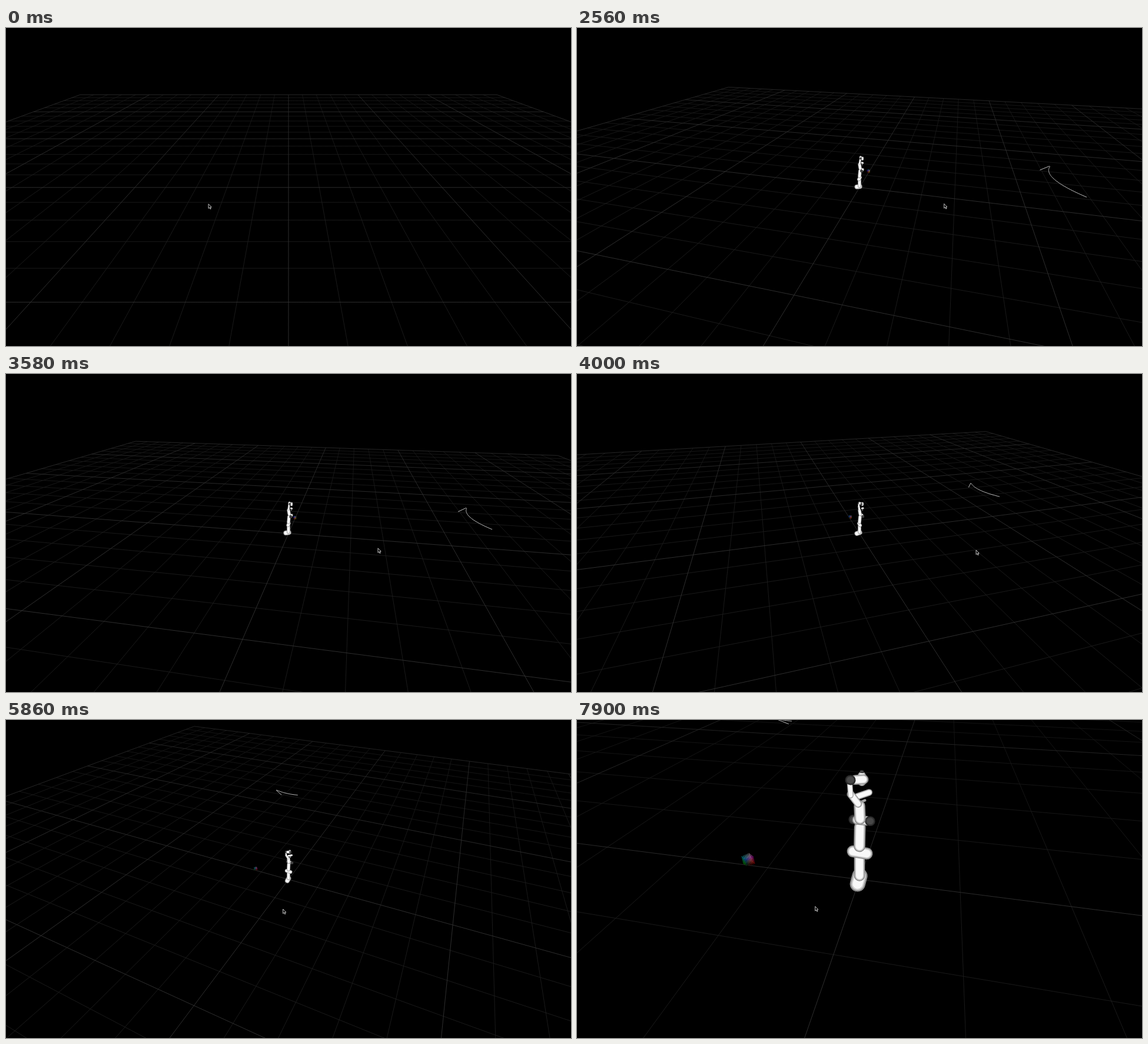
Recreate the animation shown at these times as an HTML page with a canvas. Size 960 by 540 pixels, loop 8 s.

```html
<!DOCTYPE html>
<html lang="en">
<head>
<meta charset="utf-8">
<title>Robot arm viewer</title>
<style>
html, body { margin: 0; width: 100%; height: 100%; overflow: hidden; background: #000; }
canvas { display: block; width: 960px; height: 540px; }
</style>
</head>
<body>
<canvas id="view" width="960" height="540"></canvas>
<script>
const ctx = document.getElementById('view').getContext('2d');
const LOOP = 8000, CX = 480, CY = 270.8, FOCAL = 579;
const CELL = 0.0902, HALF = 15, RAD = Math.PI / 180;
const NEAR_DIST = 0.3133;
const UNIT = NEAR_DIST / FOCAL; // one pixel at the origin in the closest view

// Monotone cubic through [time, value] pairs.
function track(...keys) {
  const last = keys.length - 1;
  const slope = i => (keys[i + 1][1] - keys[i][1]) / (keys[i + 1][0] - keys[i][0]);
  const tangent = keys.map((k, i) => {
    if (i === 0 || i === last) return 0;
    const p = slope(i - 1), q = slope(i);
    return p * q <= 0 ? 0 : 2 * p * q / (p + q);
  });
  return t => {
    if (t <= keys[0][0]) return keys[0][1];
    if (t >= keys[last][0]) return keys[last][1];
    let i = 0;
    while (t >= keys[i + 1][0]) i++;
    const [t0, v0] = keys[i], [t1, v1] = keys[i + 1];
    const h = t1 - t0, u = (t - t0) / h, w = 1 - u;
    return v0 * (1 + 2 * u) * w * w + tangent[i] * h * u * w * w
      + v1 * u * u * (3 - 2 * u) - tangent[i + 1] * h * u * u * w;
  };
}

// Smooth 0 to 1 between two times.
function ramp(t, from, to) {
  const u = Math.min(1, Math.max(0, (t - from) / (to - from)));
  return u * u * (3 - 2 * u);
}

const yawAt = track([2140, 0], [2560, 15], [2980, 28.5], [3180, 27.6], [4000, -16],
  [4660, -43.1], [5400, -73.3], [5660, -73.3], [5860, -65.5], [6020, -78.1]);
const pitchAt = track([2140, 26.4], [2560, 26.2], [3180, 24], [4000, 26.5], [4660, 37.9], [5400, 37.4]);

let cam;
function setCamera(t) {
  const yaw = yawAt(t) * RAD, pitch = pitchAt(t) * RAD;
  cam = { sy: Math.sin(yaw), cy: Math.cos(yaw), sp: Math.sin(pitch), cp: Math.cos(pitch),
    dist: NEAR_DIST ** ramp(t, 6960, 7420) };
}

function toCamera(a, b, h = 0) {
  const forward = a * cam.cy - b * cam.sy;
  return [a * cam.sy + b * cam.cy,
    forward * cam.sp + h * cam.cp,
    cam.dist + forward * cam.cp - h * cam.sp];
}

const toScreen = ([x, y, d]) => [CX + FOCAL * x / d, CY - FOCAL * y / d];
const project = (a, b, h) => toScreen(toCamera(a, b, h));

function groundLine(a0, b0, a1, b1) {
  let p = toCamera(a0, b0), q = toCamera(a1, b1);
  const near = 0.03;
  if (p[2] < near && q[2] < near) return;
  const clip = (from, to) => {
    const u = (near - from[2]) / (to[2] - from[2]);
    return from.map((v, i) => v + (to[i] - v) * u);
  };
  if (p[2] < near) p = clip(p, q);
  else if (q[2] < near) q = clip(q, p);
  ctx.moveTo(...toScreen(p));
  ctx.lineTo(...toScreen(q));
}

function drawGrid() {
  const edge = HALF * CELL;
  ctx.lineWidth = 0.9;
  for (const bold of [false, true]) {
    const fade = ctx.createLinearGradient(0, 0, 0, 540);
    fade.addColorStop(0, bold ? '#242424' : '#141414');
    fade.addColorStop(.6, bold ? '#323232' : '#1c1c1c');
    ctx.strokeStyle = fade;
    ctx.beginPath();
    for (let i = -HALF; i <= HALF; i++) {
      if ((i % 5 === 0) !== bold) continue;
      groundLine(i * CELL, -edge, i * CELL, edge);
      groundLine(-edge, i * CELL, edge, i * CELL);
    }
    ctx.stroke();
  }
}

// A parabola on the ground with a short hook; its tail recedes at a steady rate.
function drawTrail(t) {
  const tip = 0.322;
  ctx.strokeStyle = '#bcbcbc';
  ctx.lineWidth = 1;
  ctx.beginPath();
  for (let a = 0.02 + 0.000033 * t; a < tip; a += 0.005) {
    ctx.lineTo(...project(a, 0.561 + 3 * (a - 0.25) ** 2));
  }
  ctx.lineTo(...project(tip, 0.574));
  ctx.lineTo(...project(0.278, 0.537));
  ctx.stroke();
}

// Lattice of points coloured by position.
function drawCube() {
  const n = 6, side = 0.0076, dots = [];
  for (let i = 0; i < n ** 3; i++) {
    const rgb = [i, i / n, i / n / n].map(v => Math.floor(v) % n / (n - 1));
    const [x, y, z] = rgb.map(v => (v - .5) * side);
    dots.push({ p: toCamera(.1092 - .54 * x + .83 * y, .83 * x + .54 * y, .0063 + z),
      color: `rgb(${rgb.map(v => Math.round(v * 175)).join()})` });
  }
  dots.sort((m, k) => k.p[2] - m.p[2]);
  const size = 0.36 / cam.dist;
  for (const { p, color } of dots) {
    const [x, y] = toScreen(p);
    ctx.fillStyle = color;
    ctx.fillRect(x - size / 2, y - size / 2, size, size);
  }
}

const WHITE = ['#8e8e8e', '#cdcdcd', '#f8f8f8'], DARK = ['#262626', '#363636', '#484848'];
const GREY = ['#666', '#8c8c8c', '#aaa'];

// Rounded limb between two points given as [side, front, height].
const limb = (from, to, radius, tones = WHITE) => ({ from, to, radius, tones });
const ROBOT = [
  limb([0, -15, 2], [0, 2, 6], 13),
  limb([0, 0, 8], [0, 0, 46], 9),
  limb([-11, 0, 55], [12, 0, 54], 9.5),
  limb([0, 0, 66], [0, 3, 99], 9),
  limb([-13, 15, 104], [-12, 15, 104], 7.5, DARK),
  limb([13, 15, 104], [14, 15, 104], 7.5, DARK),
  limb([-7, 15, 104], [8, 15, 104], 7.5),
  limb([0, 4, 112], [0, 0, 135], 8.5),
  limb([-2, 0, 138], [-13, 0, 152], 5.5),
  limb([-13, 0, 150], [-14, 0, 168], 4),
  limb([-14, 2, 172], [-13, 2, 172], 7, DARK),
  limb([-7, 4, 172], [4, 8, 172], 7),
  limb([6, 8, 172], [7, 8, 172], 5, DARK),
  limb([0, 16, 165], [0, 16, 174], 6),
  limb([-1, 16, 180], [1, 16, 180], 2, DARK),
  limb([-7, 16, 142], [11, 16, 150], 5),
  limb([1, 16, 135], [5, 16, 137], 2, GREY)
];

function drawRobot() {
  const place = ([side, front, height]) => toCamera(-side * UNIT, front * UNIT, height * UNIT);
  const limbs = ROBOT.map(l => {
    const p = place(l.from), q = place(l.to);
    return { ...l, p, q, depth: (p[2] + q[2]) / 2 };
  }).sort((m, k) => k.depth - m.depth);
  ctx.lineCap = 'round';
  for (const { p, q, depth, radius, tones } of limbs) {
    const width = 2 * radius * UNIT * FOCAL / depth;
    tones.forEach((tone, i) => {
      ctx.strokeStyle = tone;
      ctx.lineWidth = width * (1 - i * .18);
      ctx.beginPath();
      ctx.moveTo(...toScreen(p));
      ctx.lineTo(...toScreen(q));
      ctx.stroke();
    });
  }
  ctx.lineCap = 'butt';
}

// Drags tie the pointer to the view angles; free moves add an offset.
const MOVES = [
  { from: 80, to: 860, dx: 134, dy: 18 },
  { from: 980, to: 1220, dx: 124, dy: -2 },
  { from: 1380, to: 1940, dx: 48, dy: -16 },
  { from: 5000, to: 5500, dx: -294, dy: 3 },
  { from: 6480, to: 6720, dx: 13, dy: 0 },
  { from: 7680, to: 7900, dx: -101, dy: -4.5 }
];
const ARROW = new Path2D('M0 0L0 7.6L1.8 6L3.1 8.7L4.3 8.1L3 5.5L5.2 5.4Z');

function drawCursor(t) {
  let x = 344 - 1.75 * yawAt(t), y = 298.8 + 1.75 * (pitchAt(t) - 26.4);
  for (const { from, to, dx, dy } of MOVES) {
    const u = ramp(t, from, to);
    x += dx * u;
    y += dy * u;
  }
  ctx.save();
  ctx.translate(x, y);
  ctx.fillStyle = '#000';
  ctx.fill(ARROW);
  ctx.strokeStyle = '#d8d8d8';
  ctx.lineWidth = .9;
  ctx.stroke(ARROW);
  ctx.restore();
}

function draw(t) {
  ctx.fillStyle = '#000';
  ctx.fillRect(0, 0, 960, 540);
  setCamera(t);
  drawGrid();
  if (t >= 80) {
    drawTrail(t);
    drawCube();
    drawRobot();
  }
  drawCursor(t);
}

const start = performance.now();
function tick() {
  draw((performance.now() - start) % LOOP);
  requestAnimationFrame(tick);
}
tick();
</script>
</body>
</html>
```
